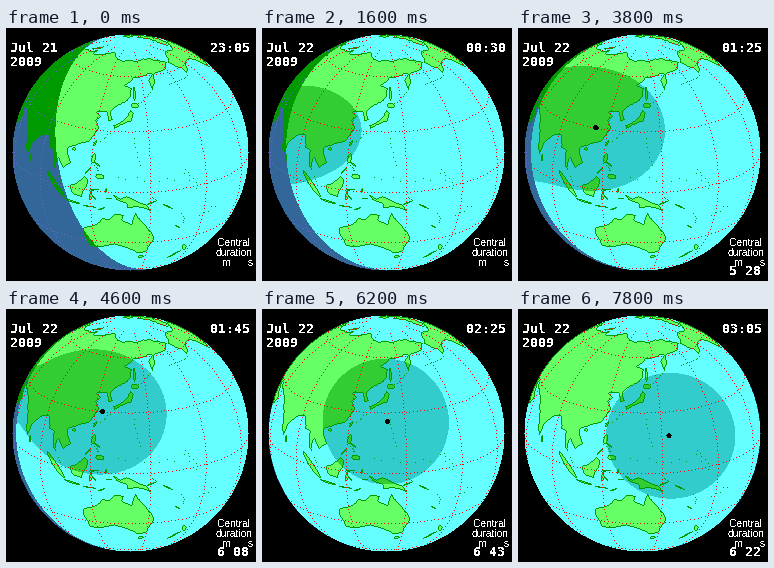
Write a matplotlib script that moves like this. It is 250 by 253 pixels and loops after 8000 ms.

```python
import numpy as np
import matplotlib.pyplot as plt
from matplotlib.animation import FuncAnimation
from matplotlib.path import Path

W, H, DPI = 250, 253, 64          # stage in pixels
CX, CY, R = 124, 124, 118         # globe on the stage
LON0, LAT0 = 140, 20              # viewpoint
SUN_DEC = 20.3
CENTRAL = 55                      # first minute of the central eclipse

SEA, LAND, COAST = (102, 255, 255), (102, 255, 102), (0, 153, 0)
NIGHT_SEA, NIGHT_LAND = (51, 102, 153), (0, 153, 0)
SHADE_SEA, SHADE_LAND = (51, 204, 204), (51, 204, 51)
GRID, NIGHT_GRID = (255, 0, 0), (102, 102, 204)

rng = np.random.default_rng(7)


def basis(lon, lat):
    """East, north and outward unit vectors at a place."""
    a, b = np.radians([lon, lat])
    east = [-np.sin(a), np.cos(a), 0]
    north = [-np.sin(b) * np.cos(a), -np.sin(b) * np.sin(a), np.cos(b)]
    out = [np.cos(b) * np.cos(a), np.cos(b) * np.sin(a), np.sin(b)]
    return np.array([east, north, out])


VIEW = basis(LON0, LAT0)


def project(lon, lat):
    a, b = np.radians(lon), np.radians(lat)
    x, y, z = VIEW @ np.array([np.cos(b) * np.cos(a),
                               np.cos(b) * np.sin(a), np.sin(b)])
    return CX + R * x, CY - R * y, z


# place on Earth of every pixel of the globe
py, px = np.mgrid[:H, :W]
u, v = (px - CX) / R, (CY - py) / R
globe = u * u + v * v <= 1
w = np.sqrt(np.clip(1 - u * u - v * v, 0, 1))
earth = np.stack([u, v, w], -1) @ VIEW
pix_lat = np.degrees(np.arcsin(np.clip(earth[..., 2], -1, 1)))
pix_lon = np.degrees(np.arctan2(earth[..., 1], earth[..., 0])) % 360
lonlat = np.column_stack([pix_lon.ravel(), pix_lat.ravel()])

land = np.zeros((H, W), bool)
specks = np.zeros((H, W), bool)
grid = np.zeros((H, W), bool)


def mainland(*pts, rough=.07):
    """Fill a coast given by key points, roughened by midpoint shifts."""
    pts = np.array(pts, float)
    for _ in range(3):
        step = np.roll(pts, -1, 0) - pts
        side = step[:, ::-1] * [-1, 1]
        mid = pts + step / 2 + side * rng.uniform(-rough, rough, (len(pts), 1))
        pts = np.stack([pts, mid], 1).reshape(-1, 2)
    inside = Path(pts).contains_points(lonlat).reshape(H, W)
    land[inside & globe] = True


def island(lon, lat, length, width, turn=0):
    """Fill an ellipse, sizes in degrees of arc."""
    c, s = np.cos(np.radians(turn)), np.sin(np.radians(turn))
    dx, dy = (pix_lon - lon) * np.cos(np.radians(lat)), pix_lat - lat
    along, across = dx * c + dy * s, dy * c - dx * s
    land[globe & (np.hypot(along / length, across / width) < .5)] = True


def dot(mask, x, y):
    mask[np.round(y).astype(int), np.round(x).astype(int)] = True


def chain(start, end, count, spread=.5):
    """Scatter specks along a line between two places."""
    places = np.linspace(start, end, count)
    places += rng.uniform(-spread, spread, places.shape)
    dot(specks, *project(*places.T)[:2])


def dotted(lon, lat, gap=3.6):
    x, y, z = project(lon, lat)
    path = np.concatenate([[0], np.cumsum(np.hypot(np.diff(x), np.diff(y)))])
    at = np.searchsorted(path, np.arange(0, path[-1], gap))
    at = at[z[at] > .1]
    dot(grid, x[at], y[at])


# Asia
mainland((10, 68), (40, 67), (60, 69), (70, 73), (75, 70), (104, 77),
         (113, 74), (140, 72), (180, 69), (189, 66), (178, 62), (163, 60),
         (162, 56), (157, 51), (156, 57), (162, 61), (143, 59), (135, 54.5),
         (141, 53), (140, 48), (131, 43), (127.5, 39.5), (129.3, 36),
         (126.3, 34.5), (125, 39.5), (121.5, 39), (118, 39), (122, 37),
         (119.3, 35), (121.8, 31), (118, 24.5), (110.5, 21), (105.8, 19),
         (109, 12.5), (105, 8.7), (101, 13.4), (100, 8), (103.8, 1.4),
         (98.3, 8.5), (97.5, 16.3), (94.3, 16.5), (91.5, 22.5), (87, 21.5),
         (80.2, 15), (77.5, 8.1), (72.8, 19), (67, 25), (57, 27), (48, 30),
         (59, 22), (45, 13), (35, 28), (20, 40))
# Australia
mainland((142.5, -10.8), (145.5, -15.5), (149, -20.5), (153.3, -27),
         (150, -37.3), (144, -38.5), (138, -34), (131, -31.5), (123.5, -34),
         (115, -34.5), (113.5, -25), (114.5, -22), (121.5, -19),
         (126, -14.2), (129.3, -15), (132, -11.5), (136.8, -12.2),
         (135.7, -15), (140.5, -17.5))
# New Guinea, Borneo, Japan
mainland((131, -1), (135, -3.2), (138, -1.7), (147.5, -6.3), (150.8, -10.5),
         (144, -7.8), (138.5, -8.1), (138, -5.5), (133, -3.8))
mainland((109, 1), (113, 3), (117, 7), (119, 5), (117.5, .5), (115.5, -4),
         (110.3, -2.8))
mainland((130, 33), (136, 36), (140, 41), (142, 39.5), (140.5, 35.3),
         (135.8, 33.8), (131, 31.3))
# North America, Arctic Canada, Greenland
mainland((190, 65.5), (203, 71), (232, 69.5), (265, 68), (295, 60),
         (290, 45), (236, 48), (226, 58.5), (210, 60.5), (197, 55),
         (198, 59), (193, 61.5))
mainland((235, 72), (240, 76), (270, 81), (297, 82), (290, 68), (255, 69.5))
mainland((290, 78), (325, 83.5), (340, 80), (320, 65), (315, 60), (305, 68))

island(142.8, 43.4, 4, 2.8)           # Hokkaido
island(142.9, 50, 8.5, 1.3, 90)       # Sakhalin
island(121, 23.7, 3.5, 1.3, 65)       # Taiwan
island(109.7, 19.2, 2.2, 1.6)         # Hainan
island(80.7, 7.8, 3.6, 2, 90)         # Sri Lanka
island(121, 16.2, 5, 2.2, 80)         # Luzon
island(123, 13.5, 4, .9, -35)
island(124.8, 7.5, 4.5, 2.8)          # Mindanao
island(118.4, 9.7, 5, .7, 50)         # Palawan
island(100.5, -.3, 16, 3, -45)        # Sumatra
island(110, -7.3, 9.5, 1.3, -7)       # Java
island(120.3, -2.5, 6, 1.5, 80)       # Sulawesi
island(122.3, .7, 5, .9, 10)
island(122, -3.5, 3.5, 1, -50)
island(128, .8, 3, 1, 80)             # Moluccas
island(129.5, -3.2, 3, .8)
island(119.5, -8.6, 7, .8)            # Lesser Sundas
island(125.3, -9.3, 4.5, .8, 25)
island(150.3, -5.6, 4.5, .9, 20)      # New Britain
island(158.5, -8.3, 7, .8, -32)       # Solomons
island(165.5, -21.3, 3.8, .7, -40)    # New Caledonia
island(146.6, -42, 3, 2.6)            # Tasmania
island(175.6, -38.5, 6.5, 2.5, -60)   # New Zealand
island(170.3, -43.7, 8, 2, 45)
island(60, 73.5, 7, 1.5, 50)          # Novaya Zemlya

chain((122.5, 12.5), (124.5, 9.5), 9, 1)   # Visayas
chain((129, 29), (124, 24.5), 5)           # Ryukyu
chain((145, 13.4), (142, 27), 7)           # Marianas, Bonins
chain((134.5, 7.4), (163, 5.5), 8, 1)      # Carolines
chain((167, 10), (174, 0), 8, 1.5)         # Marshalls, Gilberts
chain((150.8, -2.6), (153, -4.5), 4, .2)   # New Ireland
chain((167, -14), (169, -19), 5)           # Vanuatu
chain((178, -17.5), (188, -14), 5, 1)      # Fiji, Samoa
chain((146, 44.3), (155.5, 50), 7, .3)     # Kurils
chain((173, 52.8), (196, 54.5), 9, .3)     # Aleutians

core = land.copy()
for axis in (0, 1):
    for step in (-1, 1):
        core &= np.roll(land, step, axis) | ~globe
coast = (land & ~core) | specks

for lat in range(-60, 61, 30):
    dotted(np.linspace(-40, 320, 3000), np.full(3000, lat))
for lon in range(0, 360, 30):
    dotted(np.full(3000, lon), np.linspace(-80, 80, 3000))


def minute(i):
    """Minutes after midnight: one early view, then five-minute steps."""
    return -55 if i == 0 else 5 * i - 10


def duration(t):
    """Seconds of central eclipse, longest near minute 149."""
    d = t - 149
    return round(403.2 - .01709 * d ** 2 + 2.03e-5 * d ** 3)


def paint(t):
    sun = basis(181.6 - t / 4, SUN_DEC)
    x, y, z = np.moveaxis(earth @ sun.T, -1, 0)
    hours = (t - 155.3) / 60
    off = np.hypot(x - (.0202 + .5625 * hours), y - (.069 - .172 * hours))
    day = z > 0
    shade = day & (off < .533)
    img = np.zeros((H, W, 3), np.uint8)
    for area, sea, ground in ((globe, SEA, LAND),
                              (globe & shade, SHADE_SEA, SHADE_LAND),
                              (globe & ~day, NIGHT_SEA, NIGHT_LAND)):
        img[area & ~land] = sea
        img[area & land] = ground
    img[coast] = COAST
    img[grid & day] = GRID
    img[grid & ~day] = NIGHT_GRID
    if t >= CENTRAL:
        img[globe & day & (off < .021)] = 0
    return img


plt.rcParams["text.antialiased"] = False
fig = plt.figure(figsize=(W / DPI, H / DPI), dpi=DPI, facecolor="black")
picture = fig.figimage(paint(minute(0)), origin="upper")


def label(x, y, text, size=13.3, font="DejaVu Sans Mono", weight="bold"):
    return fig.text(x / W, 1 - y / H, text, color="white", family=font,
                    weight=weight, size=size * 72 / DPI, va="baseline")


def small(x, y, text):
    label(x, y, text, 10.3, "Liberation Sans", "normal")


date = label(4, 24, "")
label(4, 38, "2009")
clock = label(204, 24, "")
small(211, 218, "Central")
small(210, 228, "duration")
small(216, 238, "m")
small(242, 238, "s")
length = label(211, 247, "")


def draw(i):
    t = minute(i)
    picture.set_data(paint(t))
    date.set_text("Jul 21" if t < 0 else "Jul 22")
    clock.set_text(f"{t // 60 % 24:02d}:{t % 60:02d}")
    mins, secs = divmod(duration(t), 60)
    length.set_text(f"{mins} {secs:02d}" if t >= CENTRAL else "")
    return picture, date, clock, length


anim = FuncAnimation(fig, draw, frames=40, interval=200, repeat=True,
                     repeat_delay=0, blit=False)
plt.show()
```
